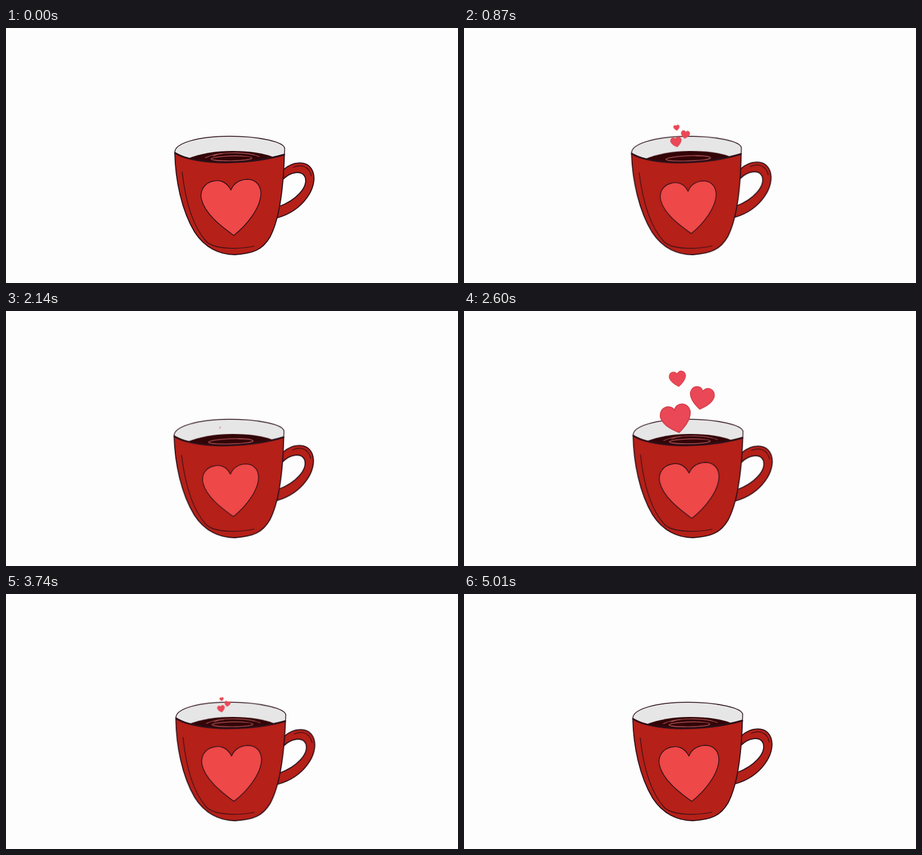
Recreate the animation shown at these times as an HTML page without scripts. Size 798x450 px, loop 5050 ms.

```html
<!DOCTYPE html>
<html lang="en">
<head>
<meta charset="utf-8">
<title>Warm cup</title>
<style>
  html, body { margin: 0; width: 100%; height: 100%; overflow: hidden; background: #fdfdfd; }
  svg { display: block; width: 100vw; height: 100vh; }

  .ink { stroke: #2b0f18; stroke-width: 1.8; stroke-linecap: round; stroke-linejoin: round; }
  .thin { stroke-width: 1.2; fill: none; }
  .red { fill: #b52018; }
  .swirl { fill: none; stroke: #b9595a; stroke-width: 1.2; stroke-linecap: round; }

  .cup { transform-origin: 403px 400px; animation: sway 5050ms infinite; }
  .love { transform-origin: 397px 316px; animation: beat 631.25ms ease-in-out infinite alternate; }
  .ring { transform-origin: 398px 230px; animation: ripple 631.25ms ease-in-out infinite alternate; }
  .wave { animation: fade 631.25ms ease-in-out infinite alternate; }
  .puff { opacity: 0; transform-origin: 379px 207px; animation: rise 5050ms linear var(--at) infinite; }

  @keyframes sway {
    0% { transform: rotate(0deg); animation-timing-function: cubic-bezier(.39, .575, .565, 1); }
    28.7% { transform: rotate(-.85deg); animation-timing-function: cubic-bezier(.37, 0, .63, 1); }
    65.3% { transform: rotate(.65deg); animation-timing-function: cubic-bezier(.47, 0, .745, .715); }
    100% { transform: rotate(0deg); }
  }
  @keyframes beat { to { transform: scale(.905); } }
  @keyframes ripple { to { transform: scale(1.13); } }
  @keyframes fade { 45%, to { opacity: 0; } }
  /* each puff lives 650 ms of the loop */
  @keyframes rise {
    0% { transform: scale(0); opacity: 1; }
    11.9% { opacity: 1; }
    12.87% { transform: scale(3.65); opacity: 0; }
    100% { transform: scale(3.65); opacity: 0; }
  }
</style>
</head>
<body>
<svg viewBox="0 0 798 450" preserveAspectRatio="none">
  <defs>
    <path id="mini" d="M0-5C-2-10-10-9-10-2C-9 4-3 8 0 10C3 8 9 4 10-2C10-9 2-10 0-5Z"/>
    <g id="trio" fill="#ea4856" stroke="#d23c48" stroke-width=".7">
      <use href="#mini" transform="translate(377 200) rotate(-12)"/>
      <use href="#mini" transform="translate(394 186.500) rotate(10) scale(.8)"/>
      <use href="#mini" transform="translate(378 174) rotate(-8) scale(.55)"/>
    </g>
  </defs>

  <g class="cup">
    <path class="ink red" d="M490 250C505 236 533 231 542 254C551 281 525 322 479 335L482 315C512 304 534 281 528 263C522 250 502 254 489 267Z"/>
    <path class="ink thin" d="M507 246C520 240 535 243 539 261"/>

    <path class="ink" fill="#e6e6e6" style="stroke-width:1.4" d="M298 220C297 203 340 191 395 191C447 191 492 201 492 213L491.500 223C460 237 340 247 298 220Z"/>
    <path fill="#330508" d="M319 231C345 221 370 217 400 217C430 217 455 221 470 227L468 232C430 240 345 240 319 231Z"/>
    <path class="swirl wave" d="M352 229C371 219 424 217 447 227M366 226C372 223 377 222 382 222"/>
    <path class="swirl ring" d="M418 226C398 225 366 227 362 231C364 236 427 235 434 230C434 227 424 226 410 226"/>

    <path class="ink red" d="M298 220C299 268 310 322 333 360C351 388 377 400 404 400C437 398 453 391 466 369C484 335 490 275 491.500 223C465 231 430 236 395 237C360 238 318 233 298 220Z"/>
    <path class="ink" fill="none" style="stroke-width:3" d="M298.500 220.500C318 233 360 238 395 237C430 236 465 231 491 223.500"/>
    <path class="ink thin" d="M311 254C316 298 328 348 353 376C367 391 410 391 438 385"/>

    <path class="ink love" fill="#ee4848" style="stroke-width:1.4" d="M397 286C389 270 376 268 367 270C350 273 342 287 345 302C351 328 380 350 402 366C424 349 450 318 450 291C449 274 438 267 425 267C411 268 402 274 397 286Z"/>

    <use class="puff" href="#trio" style="--at:5ms"/>
    <use class="puff" href="#trio" style="--at:700ms"/>
    <use class="puff" href="#trio" style="--at:1405ms"/>
    <use class="puff" href="#trio" style="--at:2125ms"/>
    <use class="puff" href="#trio" style="--at:2895ms"/>
    <use class="puff" href="#trio" style="--at:3625ms"/>
    <use class="puff" href="#trio" style="--at:4350ms"/>
  </g>
</svg>
</body>
</html>
```
